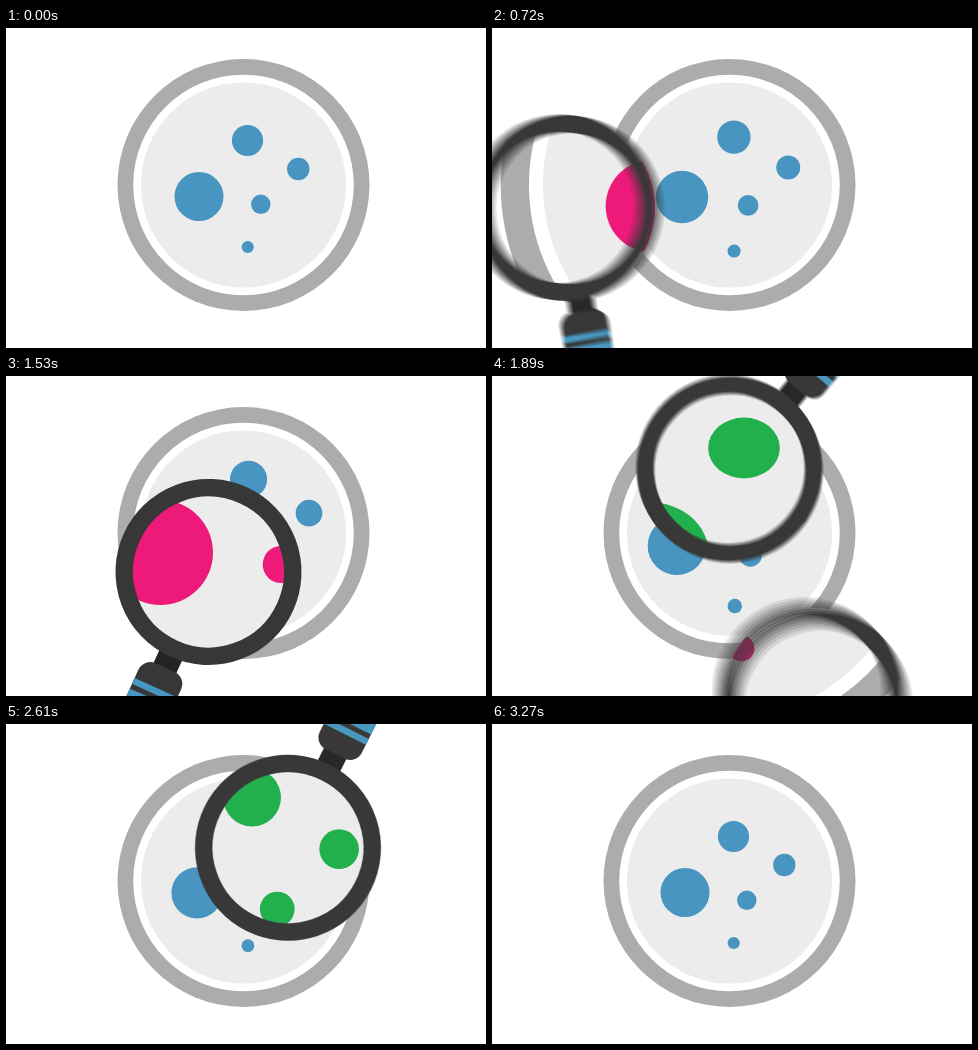
These frames come from a looping animation (480x320 px, 3300 ms). An HTML page with a canvas:

```html
<!DOCTYPE html>
<html lang="en">
<head>
<meta charset="utf-8">
<title>Petri dish under two magnifiers</title>
<style>
  html, body { margin: 0; width: 100%; height: 100%; overflow: hidden; background: #fff; }
  canvas { display: block; width: 480px; height: 320px; }
</style>
</head>
<body>
<canvas id="stage" width="480" height="320"></canvas>
<script>
const W = 480, H = 320, LOOP = 3300, STEP = 30, RAD = Math.PI / 180;
const BLUE = '#4795c0', DARK = '#373737', NECK = '#232323';
const SHUTTER = 15, SAMPLES = 8;

const ctx = document.getElementById('stage').getContext('2d');
const layer = document.createElement('canvas');
layer.width = W;
layer.height = H;
const blur = layer.getContext('2d');

// plain dots: x, y, radius
const DOTS = [
  [193, 168.5, 24.5], [241.5, 112.5, 15.6], [292.3, 141, 11.2],
  [254.8, 176.3, 9.7], [241.7, 219, 6.1]
];
// magnified dots: small pose, then large pose
const BIG_DOTS = [
  [[163, 179, 42.5], [154.5, 176.5, 52.5]],
  [[245, 74, 28], [249.5, 72, 31.7]],
  [[330, 125.5, 19.4], [343, 124, 21]],
  [[270, 184, 17], [275.3, 188.5, 18.6]],
  [[246, 264, 10.8], [249.5, 272.5, 12.9]]
];

const clamp = v => Math.max(0, Math.min(1, v));
const mix = (a, b, p) => a + (b - a) * p;
const quint = u => u < 0.5 ? 16 * u ** 5 : 1 - 16 * (1 - u) ** 5;

function pulse(t) {
  return t < 1650 ? quint(clamp(t / 1530)) : 1 - quint(clamp((t - 1770) / 1480));
}

function oval(c, x, y, rx, ry, color) {
  c.fillStyle = color;
  c.beginPath();
  c.ellipse(x, y, rx, ry, 0, 0, 2 * Math.PI);
  c.fill();
}
const disc = (c, x, y, r, color) => oval(c, x, y, r, r, color);

function dish(x, y, k) {
  disc(ctx, x, y, 126 * k, '#acacac');
  disc(ctx, x, y, 110.3 * k, '#fff');
  disc(ctx, x, y, 102.6 * k, '#ececec');
}

// Lens poses: swing in, rest, swing out
function poseA(t) {
  const f = clamp((1080 - t) / 480) ** 3 * (480 / 360) ** 3;
  const u = Math.max(0, (t - 1590) / 300);
  const g = u ** 3;
  return {
    x: 202.5 - 129.5 * f + 118 * g,
    y: 196 - 16 * f + 126 * g,
    a: 24.4 - 34 * f + 46 * u ** 1.2
  };
}

function poseB(t) {
  const v = Math.max(0, (2180 - t) / 290);
  const f = Math.max(0, (t - 2550) / 240) ** 3;
  return {
    x: 280.5 - 43 * v ** 1.5 + 94 * f,
    y: 123 - 30 * v ** 3 + 24 * f * (2 - f),
    a: 207 + 13 * v - 25.3 * f
  };
}

const LENSES = [
  { pose: poseA, from: 600, to: 2100, color: '#ee1a79', clip: 90, lead: 0 },
  { pose: poseB, from: 1600, to: 2960, color: '#22b04c', clip: 82, lead: 6 }
];

function magnifier(c, p) {
  c.save();
  c.translate(p.x, p.y);
  c.rotate(p.a * RAD);
  c.fillStyle = NECK;
  c.fillRect(-12.5, 90, 25, 20);
  c.fillStyle = DARK;
  c.beginPath();
  c.roundRect(-23.5, 105, 47, 125, 13);
  c.fill();
  c.fillStyle = BLUE;
  c.fillRect(-23.5, 127, 47, 6.5);
  c.fillRect(-23.5, 138.5, 47, 70);
  c.strokeStyle = DARK;
  c.lineWidth = 17.6;
  c.beginPath();
  c.arc(0, 0, 84.2, 0, 2 * Math.PI);
  c.stroke();
  c.restore();
}

function blurred(pose, t) {
  const a = pose(t - SHUTTER / 2), b = pose(t + SHUTTER / 2);
  if (Math.hypot(b.x - a.x, b.y - a.y) < 0.5) {
    magnifier(ctx, pose(t));
    return;
  }
  blur.clearRect(0, 0, W, H);
  // each sample is drawn whole, then added at equal weight
  for (let i = 0; i < SAMPLES; i++) {
    const s = sample.getContext('2d');
    s.clearRect(0, 0, W, H);
    magnifier(s, pose(t + SHUTTER * ((i + 0.5) / SAMPLES - 0.5)));
    blur.globalCompositeOperation = 'lighter';
    blur.globalAlpha = 1 / SAMPLES;
    blur.drawImage(sample, 0, 0);
  }
  blur.globalAlpha = 1;
  blur.globalCompositeOperation = 'source-over';
  ctx.drawImage(layer, 0, 0);
}
const sample = document.createElement('canvas');
sample.width = W;
sample.height = H;

function glass(lens, t, p) {
  const c = lens.pose(t);
  const speed = (lens.pose(t + 5).x - lens.pose(t - 5).x) / 10;
  const squash = lens.pose === poseB ? clamp((2250 - t) / 360) : 0;
  ctx.save();
  ctx.beginPath();
  ctx.arc(c.x + lens.lead * clamp(speed), c.y, lens.clip, 0, 2 * Math.PI);
  ctx.clip();
  ctx.fillStyle = '#fff';
  ctx.fillRect(0, 0, W, H);
  dish(235.5, 157, 1.8);
  for (const [a, b] of BIG_DOTS) {
    const [x, y, r] = a.map((v, i) => mix(v, b[i], p));
    oval(ctx, x + 2.5 * squash, y, r * (1 + 0.13 * squash), r * (1 - 0.04 * squash), lens.color);
  }
  ctx.restore();
}

function draw(t) {
  const p = pulse(t), k = 1 + 0.19 * p;
  ctx.fillStyle = '#fff';
  ctx.fillRect(0, 0, W, H);
  dish(237.5, 157, 1);
  for (const [x, y, r] of DOTS) {
    disc(ctx, 236 + (x - 236) * k, 161 + (y - 161) * k, r * k, BLUE);
  }
  for (const lens of LENSES) {
    if (t < lens.from || t > lens.to) continue;
    glass(lens, t, p);
    blurred(lens.pose, t);
  }
}

const start = performance.now();
function tick() {
  const t = (performance.now() - start) % LOOP;
  draw(Math.floor(t / STEP) * STEP);
  requestAnimationFrame(tick);
}
tick();
</script>
</body>
</html>
```
